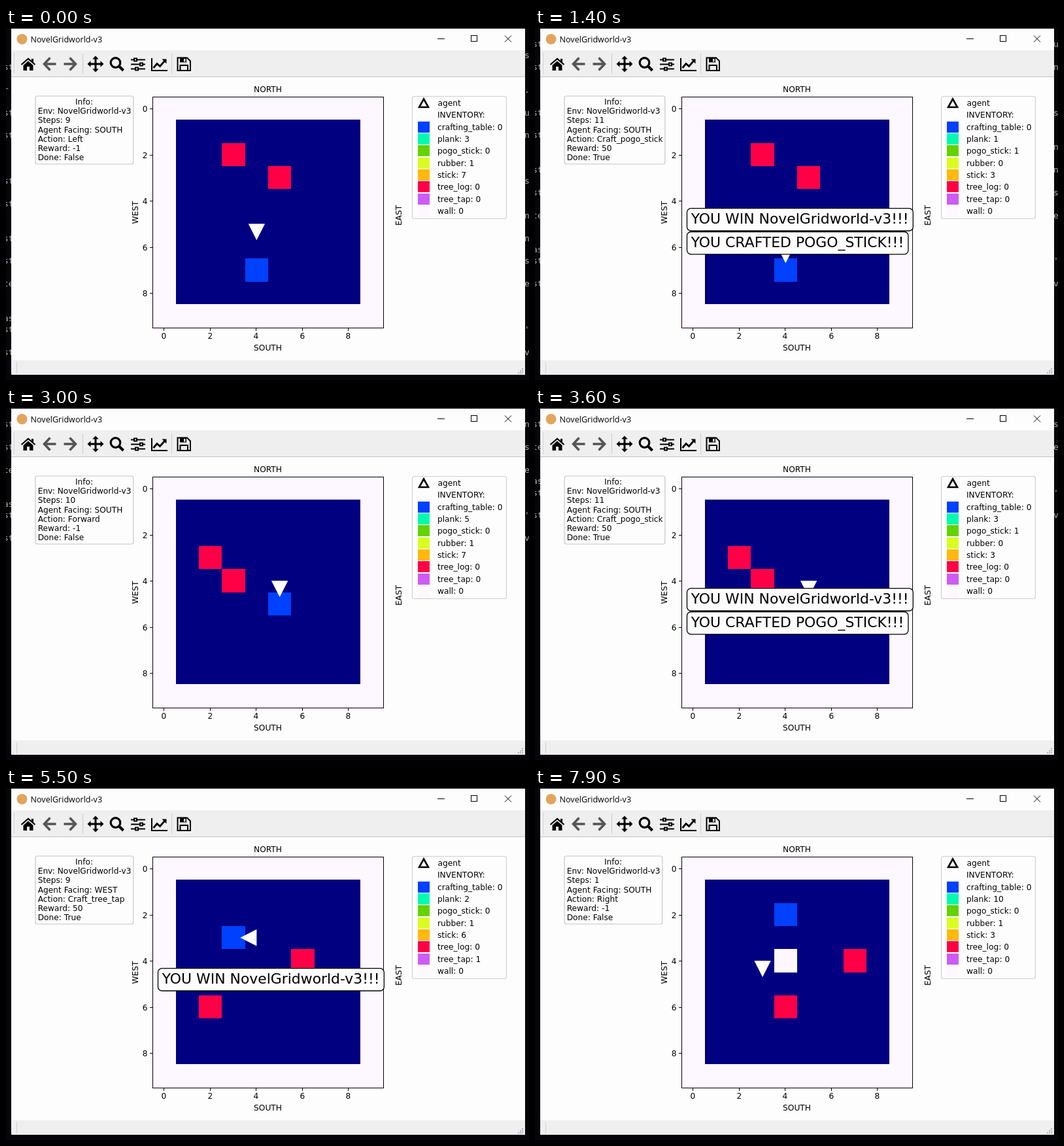
These frames come from a looping animation (800 px wide and 538 px high, 8 s). An HTML page with a canvas:

```html
<!DOCTYPE html>
<html lang="en">
<head>
<meta charset="utf-8">
<title>NovelGridworld-v3</title>
<style>
html, body { margin: 0; width: 100%; height: 100%; overflow: hidden; background: #08050a; }
canvas { display: block; }
</style>
</head>
<body>
<canvas id="stage" width="800" height="538"></canvas>
<script>
const ctx = document.getElementById('stage').getContext('2d');
const LOOP = 8000, TICK = 100, CELL = 35.28, LEFT = 224.6, TOP = 105.3;
const SANS = '"DejaVu Sans", Verdana, sans-serif';
const FONT = '12.2px ' + SANS;
const DIRS = ['NORTH', 'EAST', 'SOUTH', 'WEST'];
const MOVES = [[0, -1], [1, 0], [0, 1], [-1, 0]];
const NAMES = { L: 'Left', R: 'Right', F: 'Forward' };
const COLORS = {
  crafting_table: '#0040ff', plank: '#00fbb0', pogo_stick: '#63d200', rubber: '#d9fd22',
  stick: '#ffb80c', tree_log: '#ff0047', tree_tap: '#cc5cf4', wall: '#fdf8ff'
};
const RECIPES = {
  pogo_stick: { plank: -2, stick: -4, rubber: -1, pogo_stick: 1 },
  tree_tap: { plank: -5, stick: -1, tree_tap: 1 },
  plank: { plank: 4 }
};

// acts: L/R turn, F forward, C craft the goal item
const EPISODES = [
  { start: 0, gap: 200, first: 9, pos: [4, 5], dir: 3, acts: 'LFC', goal: 'pogo_stick',
    table: [4, 7], trees: [[3, 2], [5, 3]], inv: { plank: 3, rubber: 1, stick: 7 } },
  { start: 1600, gap: 150, first: 1, pos: [2, 2], dir: 0, acts: 'LLLFFFRFFFC', goal: 'pogo_stick',
    table: [5, 5], trees: [[2, 3], [3, 4]], inv: { plank: 5, rubber: 1, stick: 7 } },
  { start: 4300, gap: 150, first: 1, pos: [7, 6], dir: 1, acts: 'LFFFLFFFC', goal: 'tree_tap',
    table: [3, 3], trees: [[6, 4], [2, 6]], inv: { plank: 7, rubber: 1, stick: 7 } },
  { start: 6700, gap: 150, first: 1, pos: [3, 5], dir: 3, acts: 'C', goal: 'plank',
    table: [2, 5], trees: [[3, 2], [6, 6]], inv: { plank: 2, rubber: 1, stick: 3 } },
  { start: 7900, gap: 150, first: 1, pos: [3, 4], dir: 1, acts: 'R', goal: 'tree_tap',
    table: [4, 2], trees: [[7, 4], [4, 6]], wall: [4, 4], inv: { plank: 10, rubber: 1, stick: 3 } }
];

// Terminal output behind the window: [lines above the last, left edge, right edge]
const LOG = [
  [0, 'st', 'v1'], [2, 'st', "'s"], [3, 'as', ''], [6, 'te', 'ex'], [8, 'st', 'su'],
  [10, 'st', 'ns'], [12, '', 'ns'], [13, 'st', ''], [15, 'st', 'st'], [19, 'st', 'ns'],
  [21, 'st', 'ur'], [23, 'r ', '.'], [25, 'st', ''], [26, '', 's']
];
const PRINTS = [200, 400, 400, 400, 1300, 1300, 1600, 1750, 1900, 2050, 2200, 2350, 2500, 2650,
  2800, 2950, 3000, 3100, 3100, 4000, 4000, 4300, 4300, 4450, 4600, 4750, 4900, 5050, 5200, 5350];

function stateAt(t) {
  const ep = EPISODES.filter(e => e.start <= t).pop();
  const count = Math.min(ep.acts.length, Math.floor((t - ep.start) / ep.gap) + 1);
  const solid = [ep.table, ...ep.trees];
  if (ep.wall) solid.push(ep.wall);
  let [x, y] = ep.pos, dir = ep.dir, act = '';
  const inv = { ...ep.inv };
  for (act of ep.acts.slice(0, count)) {
    if (act === 'L') dir = (dir + 3) % 4;
    if (act === 'R') dir = (dir + 1) % 4;
    if (act === 'F') {
      const nx = x + MOVES[dir][0], ny = y + MOVES[dir][1];
      if (!solid.some(s => s[0] === nx && s[1] === ny)) [x, y] = [nx, ny];
    }
    if (act === 'C') {
      for (const k in RECIPES[ep.goal]) inv[k] = (inv[k] || 0) + RECIPES[ep.goal][k];
    }
  }
  return { ep, x, y, dir, inv, done: act === 'C', steps: ep.first + count - 1,
    action: NAMES[act] || 'Craft_' + ep.goal };
}

function rect(x, y, w, h, color) {
  ctx.fillStyle = color;
  ctx.fillRect(x, y, w, h);
}

function text(str, x, y, font = FONT, align = 'left', color = '#000') {
  ctx.font = font;
  ctx.textAlign = align;
  ctx.fillStyle = color;
  ctx.fillText(str, x, y);
}

function path(points, closed) {
  ctx.beginPath();
  points.forEach(p => ctx.lineTo(p[0], p[1]));
  if (closed) ctx.closePath();
}

function poly(points, color) {
  path(points, true);
  ctx.fillStyle = color;
  ctx.fill();
}

function line(points, color = '#000', width = 1, closed = false) {
  path(points, closed);
  ctx.strokeStyle = color;
  ctx.lineWidth = width;
  ctx.stroke();
}

function ring(x, y, r, width) {
  ctx.beginPath();
  ctx.arc(x, y, r, 0, 7);
  ctx.strokeStyle = '#000';
  ctx.lineWidth = width;
  ctx.stroke();
}

function panel(x, y, w, h, r, stroke, width) {
  ctx.beginPath();
  ctx.roundRect(x, y, w, h, r);
  ctx.fillStyle = '#fefdfe';
  ctx.fill();
  ctx.strokeStyle = stroke;
  ctx.lineWidth = width;
  ctx.stroke();
}

function sideText(str, x, y) {
  ctx.save();
  ctx.translate(x, y);
  ctx.rotate(-Math.PI / 2);
  text(str, 0, 0, FONT, 'center');
  ctx.restore();
}

function terminal(t) {
  rect(0, 0, 800, 538, '#08050a');
  const scrolled = PRINTS.filter(p => p <= t).length;
  const font = '13px "DejaVu Sans Mono", monospace';
  for (const [k, a, b] of LOG) {
    const y = 500 - 17.45 * (k + scrolled);
    text(a, -4, y, font, 'left', '#b0aeb0');
    text(b, 793, y, font, 'left', '#b0aeb0');
  }
}

function titleBar() {
  rect(8, 1, 786, 529, '#fefdfe');
  ctx.beginPath();
  ctx.arc(24.5, 17, 8, 0, 7);
  ctx.fillStyle = '#e3a45c';
  ctx.fill();
  text('NovelGridworld-v3', 37.5, 21.5, '12.6px "Open Sans", "Noto Sans", sans-serif');
  line([[660, 16.5], [671, 16.5]]);
  ctx.strokeRect(711.5, 11.5, 9, 9);
  line([[763, 11.5], [773, 21.5]]);
  line([[773, 11.5], [763, 21.5]]);
}

function arrow(x, flip) {
  const s = flip ? -1 : 1;
  line([[x + s, 45.5], [x - 8 * s, 55], [x + s, 64.5]], '#555', 3.6);
  line([[x - 7 * s, 55], [x + 10 * s, 55]], '#555', 3.6);
}

function toolBar() {
  rect(8, 34, 786, 40, '#f0eff0');
  rect(8, 74, 786, 1, '#c4c2c4');
  for (let y = 38; y < 71; y += 3) rect(12, y, 1, 1.5, '#bbb');
  rect(117, 39, 1, 31, '#cccacc');
  rect(253, 39, 1, 31, '#cccacc');

  // home
  line([[23.5, 56], [34, 47], [44.5, 56]], '#000', 2.3);
  rect(39, 47, 3, 6, '#000');
  poly([[26.5, 57], [34, 50.5], [41.5, 57], [41.5, 65], [36, 65], [36, 59], [32, 59], [32, 65], [26.5, 65]], '#000');

  arrow(66.5, false);
  arrow(98.5, true);

  // pan
  line([[137, 46], [137, 64]], '#000', 3);
  line([[128, 55], [146, 55]], '#000', 3);
  for (const [dx, dy] of MOVES) {
    const cx = 137 + dx * 7.5, cy = 55 + dy * 7.5;
    poly([[cx + dx * 5, cy + dy * 5], [cx + dy * 4.7, cy + dx * 4.7], [cx - dy * 4.7, cy - dx * 4.7]], '#000');
  }

  // zoom
  ring(167.5, 53, 7.3, 3.2);
  line([[172.5, 58], [179.5, 65]], '#000', 4.2);

  // sliders
  [[48.5, 198], [55.5, 207], [62.5, 200]].forEach(([y, x]) => {
    line([[191, y], [213, y]], '#000', 2);
    rect(x - 3, y - 3, 6, 6, '#000');
    rect(x - 1, y - 1, 2, 2, '#f0eff0');
  });

  // chart
  line([[223, 46], [223, 65], [247, 65]], '#000', 2);
  line([[225.5, 61], [231, 54.5], [235.5, 58.5], [243, 50]], '#000', 2.8);
  poly([[238.5, 47.5], [245.5, 47.5], [245.5, 54.5]], '#000');

  // save
  line([[262.5, 45.5], [277, 45.5], [282, 50.5], [282, 65], [262.5, 65]], '#000', 2, true);
  rect(266, 46, 10, 6.5, '#000');
  rect(272, 47, 2.5, 4.5, '#f0eff0');
  ctx.strokeRect(266.5, 57, 11.5, 8);
}

function statusBar() {
  rect(8, 508, 786, 22, '#f0eff0');
  rect(16, 511, 1, 17, '#d0ced0');
  for (let i = 0; i < 3; i++)
    for (let j = 0; j <= i; j++) rect(789 - 3 * j, 520 + 3 * i, 2, 2, '#b4b2b4');
}

function tile([c, r], color) {
  const x = Math.round(LEFT + c * CELL), y = Math.round(TOP + r * CELL);
  rect(x, y, Math.round(LEFT + (c + 1) * CELL) - x, Math.round(TOP + (r + 1) * CELL) - y, color);
}

function plot(s) {
  rect(225, 105, 353, 353, COLORS.wall);
  rect(260, 140, 282, 282, '#000080');
  tile(s.ep.table, COLORS.crafting_table);
  s.ep.trees.forEach(p => tile(p, COLORS.tree_log));
  if (s.ep.wall) tile(s.ep.wall, COLORS.wall);

  const cx = LEFT + (s.x + 0.5) * CELL, cy = TOP + (s.y + 0.5) * CELL;
  const [dx, dy] = MOVES[s.dir];
  poly([[cx + dx * 25, cy + dy * 25], [cx + dy * 12.7, cy + dx * 12.7], [cx - dy * 12.7, cy - dx * 12.7]], '#fff');

  ctx.strokeStyle = '#000';
  ctx.lineWidth = 1;
  ctx.strokeRect(224.5, 105.5, 353, 353);
  for (let k = 0; k < 10; k += 2) {
    const x = Math.round(LEFT + (k + 0.5) * CELL) - 0.5, y = Math.round(TOP + (k + 0.5) * CELL) + 0.5;
    line([[x, 459], [x, 463]]);
    line([[220, y], [224, y]]);
    text(k, x, 475, FONT, 'center');
    text(k, 216.5, y + 4.5, FONT, 'right');
  }
  text('NORTH', 400.5, 98, FONT, 'center');
  text('SOUTH', 400.5, 493, FONT, 'center');
  sideText('WEST', 201.5, 282);
  sideText('EAST', 604.5, 286.5);
}

function info(s) {
  const rows = ['Env: NovelGridworld-v3', 'Steps: ' + s.steps, 'Agent Facing: ' + DIRS[s.dir],
    'Action: ' + s.action, 'Reward: ' + (s.done ? 50 : -1), 'Done: ' + (s.done ? 'True' : 'False')];
  ctx.font = FONT;
  const width = Math.max(...rows.map(r => ctx.measureText(r).width));
  panel(45, 104, width + 7, 104, 3, '#c8c6c8', 1.2);
  text('Info:', 106, 117);
  rows.forEach((r, i) => text(r, 48.7, 131.3 + i * 14.15));
}

function legend(s) {
  panel(621.5, 104.5, 144, 187, 3, '#d0ced0', 1.2);
  line([[639, 108.5], [646, 121], [632, 121]], '#000', 2.6, true);
  text('agent', 660.5, 119);
  text('INVENTORY:', 660, 137.3);
  Object.keys(COLORS).forEach((name, i) => {
    const y = 151.2 + i * 18.36;
    rect(630, Math.round(y - 8.7), 18, 17, COLORS[name]);
    text(name + ': ' + (s.inv[name] || 0), 660, y + 4.4);
  });
}

function banner(str, y) {
  const font = '21.9px ' + SANS;
  ctx.font = font;
  panel(232.5, y, ctx.measureText(str).width + 13, 34.3, 6, '#000', 1.3);
  text(str, 238.7, y + 23.4, font);
}

function draw(now) {
  const t = Math.floor((now % LOOP) / TICK) * TICK;
  const s = stateAt(t);
  terminal(t);
  titleBar();
  toolBar();
  statusBar();
  plot(s);
  info(s);
  legend(s);
  if (s.done) {
    banner('YOU WIN NovelGridworld-v3!!!', 275.7);
    if (s.ep.goal === 'pogo_stick') banner('YOU CRAFTED POGO_STICK!!!', 311.5);
  }
}

let origin = null;
function frame(now) {
  if (origin === null) origin = now;
  draw(now - origin);
  requestAnimationFrame(frame);
}
draw(0);
requestAnimationFrame(frame);
</script>
</body>
</html>
```
